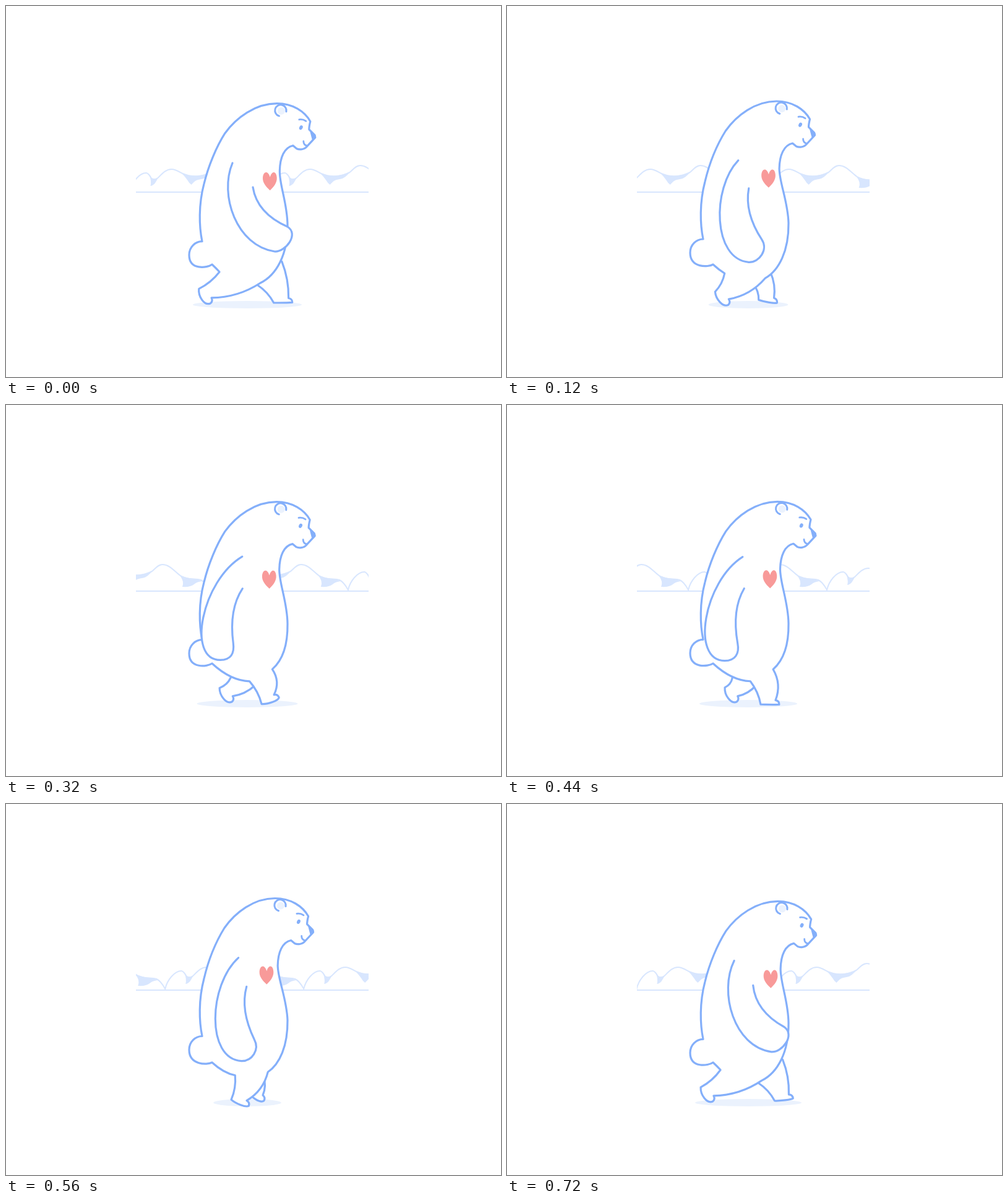
An HTML page with a canvas that plays this animation: 800x600 px, repeating every 0.76 s.

```html
<!DOCTYPE html>
<html lang="en">
<head>
<meta charset="utf-8">
<title>Walking bear</title>
<style>
  html, body { margin: 0; width: 100%; height: 100%; overflow: hidden; background: #fff; }
  canvas { display: block; }
</style>
</head>
<body>
<canvas id="stage" width="800" height="600"></canvas>
<script>
const ctx = document.getElementById('stage').getContext('2d');
const LINE = '#84affa', PALE = '#d8e6fe', SHADOW = '#ebf2fd', HEART = '#f89a99';
const STEP = 40, STEPS = 19, STRIDE = 750, SPAN = 224, TAU = 2 * Math.PI;

const clamp = v => Math.max(0, Math.min(1, v));
const smooth = v => v * v * (3 - 2 * v);
const mix = (p, q, s) => p.map((v, i) => v + (q[i] - v) * s);
const arc = (p, q, r, s) => mix(mix(p, q, s), mix(q, r, s), s);

// Control point that bows the segment p-q sideways by k.
function bow(p, q, k) {
  const dx = q[0] - p[0], dy = q[1] - p[1], n = k / Math.hypot(dx, dy);
  return [(p[0] + q[0]) / 2 + dy * n, (p[1] + q[1]) / 2 - dx * n];
}

function paint(path, fill, stroke, width = 3.2) {
  if (fill) { ctx.fillStyle = fill; ctx.fill(path); }
  if (stroke) { ctx.strokeStyle = stroke; ctx.lineWidth = width; ctx.stroke(path); }
}

function ellipse(x, y, rx, ry, turn, fill) {
  const path = new Path2D();
  path.ellipse(x, y, rx, ry, turn, 0, TAU);
  paint(path, fill);
}

const RIDGE = new Path2D('M0 299C3 285 15 270 26 270C30 270 32 275 34 278Q38 283 45 278C52 271 58 264 67 264' +
  'C74 264 79 268 85 271C100 278 118 276 131 269C137 264 141 258 148 258C160 258 168 270 177 276' +
  'C190 284 200 280 210 283C215 285 219 290 224 299');
const SNOW = new Path2D('M31 274Q37 283 46 277Q42 284 40 287Q36 291 33 291Q35 282 31 274Z' +
  'M83 270C98 277 116 276 132 268C126 275 122 279 115 280Q107 281 104 284L99 289Q95 286 93 282Q88 275 83 270Z' +
  'M174 274C188 282 200 279 212 285Q203 286 199 290Q193 295 180 294Q184 284 174 274Z');
const GROUND = new Path2D('M210 301H586');

function drawHills(t) {
  ctx.save();
  ctx.beginPath();
  ctx.rect(210, 150, 376, 200);
  ctx.clip();
  paint(GROUND, null, PALE, 2.2);
  ctx.translate(200.5 - t * SPAN, 0);
  for (let k = 0; k < 4; k++) {
    paint(SNOW, PALE);
    paint(RIDGE, null, PALE, 2);
    ctx.translate(SPAN, 0);
  }
  ctx.restore();
}

// Hip joints slide from rear to front as the leg swings; sag lowers the foot under the body.
const NEAR = {
  x: 321, reach: 112, floor: 481, sag: 14, curve: 12,
  rump: [[345, 430], [394, 447]], groin: [[411, 448], [425, 430], [431, 427]]
};
const FAR = {
  x: 352, reach: 96, floor: 480, sag: 0, curve: 6,
  rump: [[363, 441], [406, 451]], groin: [[402, 454], [404, 450], [446, 413]]
};

function poseLeg(leg, angle) {
  const a = angle % TAU, fwd = (1 - Math.cos(a)) / 2;
  const strike = Math.exp(-(((a - 2.68) / .3) ** 2));
  const pitch = (26 + 26 * Math.cos(a) + 6 * Math.sin(a) - 26 * strike) * Math.PI / 180;
  const c = Math.cos(pitch), s = Math.sin(pitch), tilt = Math.abs(s);
  const x = leg.x + leg.reach * fwd;
  const y = leg.floor - 15 * tilt + leg.sag * fwd * Math.sin(a) ** 2;
  const foot = (along, up) => [x + along * c + up * s, y + along * s - up * c];
  return {
    rump: mix(...leg.rump, smooth(fwd)),
    groin: arc(...leg.groin, fwd),
    heel: foot(-15, 0),
    sole: [foot(-6, -11 * tilt), foot(12, -13 * tilt)],
    toe: foot(15, 0),
    instep: foot(15, 6),
    ankle: foot(9, 7),
    curve: leg.curve
  };
}

function addLeg(path, p) {
  path.quadraticCurveTo(...bow(p.rump, p.heel, 5), ...p.heel);
  path.bezierCurveTo(...p.sole[0], ...p.sole[1], ...p.toe);
  path.quadraticCurveTo(...p.instep, ...p.ankle);
  path.quadraticCurveTo(...bow(p.ankle, p.groin, -p.curve), ...p.groin);
}

function drawFarLeg(p) {
  const leg = new Path2D();
  leg.moveTo(...p.rump);
  addLeg(leg, p);
  paint(leg, '#fff', LINE);
}

function drawBody(p, lift) {
  const body = new Path2D();
  // The whole torso rises while the head leans back.
  const warp = (...q) => q.map((v, i) => i % 2
    ? v - 5.8 * lift
    : v - 3.6 * lift * clamp((355 - q[i + 1]) / 90) * clamp((v - 320) / 110));
  const curve = (...q) => body.bezierCurveTo(...warp(...q));
  const line = (...q) => body.lineTo(...warp(...q));

  const [kx, ky] = p.rump, half = (kx - 333) / 2;
  body.moveTo(333, 418);
  body.quadraticCurveTo(333 + half, 418 + .92 * half, kx, ky);
  addLeg(body, p);

  const [x, y] = p.groin, [bx, by] = warp(455, 355);
  body.bezierCurveTo(x + .6 * (bx - x), y - 13, 455.5, (by + y) / 2, bx, by);
  curve(455, 320, 442, 290, 442.5, 267);
  curve(443, 245, 450, 229, 464, 226);
  line(470, 231);
  curve(474, 233, 482, 233, 487, 227);
  line(500, 213);
  line(499, 209);
  line(490, 200);
  curve(490, 195, 491, 191, 492, 187);
  curve(483, 171, 464, 158, 438, 158);
  curve(403, 158, 372, 181, 354, 206);
  curve(340, 228, 327, 259, 320, 288);
  curve(311, 322, 312, 357, 317, 381);
  curve(306, 381, 296, 390, 296, 403);
  body.bezierCurveTo(...warp(296, 428), 325, 424 - 2 * lift, 333, 418);
  body.closePath();
  paint(body, '#fff', LINE);
}

// Shoulder, outer edge, hand and inner edge at both ends of the swing.
const ARM_FRONT = [[366, 254], [344, 306], [373, 388], [434, 397], [452, 398],
  [474, 369], [455, 357], [428, 345], [404, 325], [399, 293]];
const ARM_BACK = [[382, 245], [316, 284], [290, 412], [345, 412], [362, 412],
  [368, 402], [366, 385], [362, 352], [365, 322], [382, 297]];

function drawArm(t) {
  const w = Math.sin(Math.PI * (t + .45 * t ** 3 * (1 - t)));
  const p = ARM_FRONT.map((front, i) => {
    const [x, y] = mix(front, ARM_BACK[i], w);
    return [x, y + 40 * w * (1 - w) * clamp((y - 300) / 100)];
  });
  const arm = new Path2D();
  arm.moveTo(...p[0]);
  for (let i = 1; i < p.length; i += 3) arm.bezierCurveTo(...p[i], ...p[i + 1], ...p[i + 2]);
  paint(arm, '#fff', LINE);
}

const EAR = new Path2D('M453 171A9.2 9.2 0 1 0 441.5 178.2');
const NOSE = new Path2D('M492.5 204L500 209.5Q501.5 213 496 217.5Q494.5 212 492.5 204Z');
const MOUTH = new Path2D('M481 219Q481 225 487 226.5');
const BROW = new Path2D('M474 184Q480 183 485 186.5');
const HEART_SHAPE = new Path2D('M427 298.5C420 292 415 286 415.3 278C416 267 424 266 427 277' +
  'C430 266 437.5 267 438 278C438.5 286 433 293 427 298.5Z');

function shifted(dx, dy, draw) {
  ctx.save();
  ctx.translate(dx, dy);
  draw();
  ctx.restore();
}

function drawFace(lift) {
  shifted(-lift, -5.8 * lift, () => {
    ellipse(445, 170, 6, 6, 0, SHADOW);
    paint(EAR, null, LINE, 3);
  });
  shifted(-3.5 * lift, -5.8 * lift, () => {
    paint(NOSE, LINE, LINE, 1.5);
    paint(MOUTH, null, LINE, 2.8);
  });
  shifted(-4.3 * lift, -7 * lift, () => {
    paint(BROW, null, LINE, 2.8);
    ellipse(477, 197, 2.7, 3.7, .45, LINE);
  });
  shifted(-6 * lift, -7 * lift, () => paint(HEART_SHAPE, HEART));
}

function render(t) {
  const angle = TAU * t, lift = .05 + .9 * Math.sin(angle) ** 2;
  ctx.fillStyle = '#fff';
  ctx.fillRect(0, 0, 800, 600);
  ctx.lineCap = ctx.lineJoin = 'round';
  drawHills(t);
  ellipse(390, 483, 90 - 37 * lift, 6, 0, SHADOW);
  drawFarLeg(poseLeg(FAR, angle + Math.PI + .1));
  drawBody(poseLeg(NEAR, angle), lift);
  drawArm(t);
  drawFace(lift);
}

const start = performance.now();
function tick() {
  const step = Math.floor((performance.now() - start) / STEP) % STEPS;
  render(step * STEP / STRIDE);
  requestAnimationFrame(tick);
}
tick();
</script>
</body>
</html>
```
